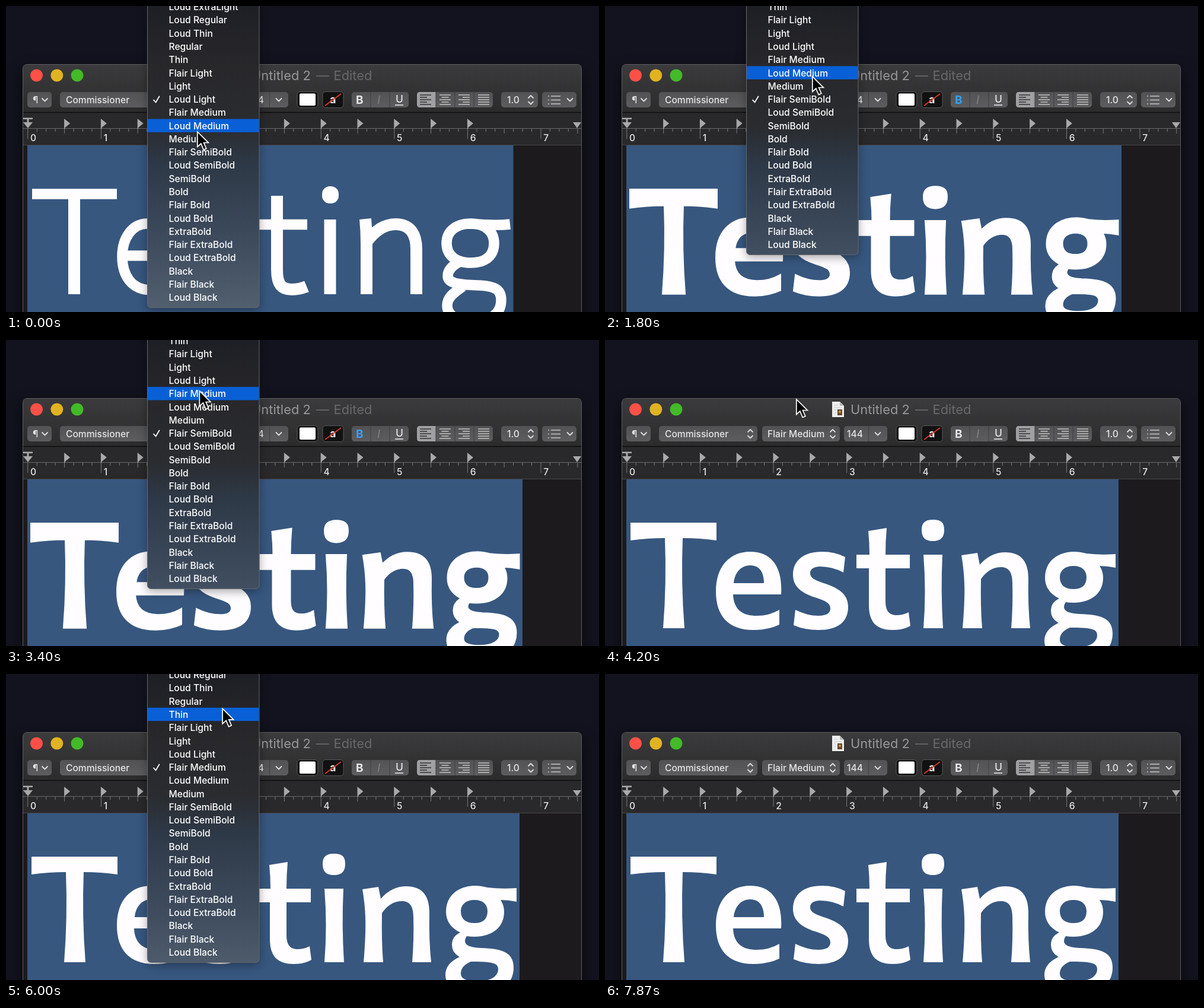
Recreate the animation shown at these times as an HTML page. Size 1000 by 516 pixels, loop 7940 ms.

```html
<!DOCTYPE html>
<html lang="en">
<head>
<meta charset="utf-8">
<title>Font menu</title>
<style>
html, body { margin: 0; width: 100%; height: 100%; overflow: hidden; background: #12131e; }
svg { display: block; width: 100%; height: 100%; }
text { font: 500 15.6px Inter, "Open Sans", sans-serif; fill: #e6e6e7; white-space: pre; }
.title { font-size: 21.9px; font-weight: 400; fill: #98989a; }
.dim { fill: #68686a; }
.line { fill: none; stroke: #dededf; stroke-width: 1.8; stroke-linecap: round; stroke-linejoin: round; }
.glyphs { fill: #fffdff; fill-rule: evenodd; }
.thin { fill: none; stroke: #fffdff; }
#menu text { fill: #fff; }
#menuBox { filter: drop-shadow(0 4px 8px rgba(0,0,0,.35)); }
</style>
</head>
<body>
<svg id="stage" viewBox="0 0 1000 516" preserveAspectRatio="none">
  <defs>
    <linearGradient id="chrome" x1="0" y1="0" x2="0" y2="1">
      <stop stop-color="#3b3b3d"/><stop offset="1" stop-color="#2b2b2c"/>
    </linearGradient>
    <linearGradient id="button" x1="0" y1="0" x2="0" y2="1">
      <stop stop-color="#525254"/><stop offset="1" stop-color="#5d5d5f"/>
    </linearGradient>
    <linearGradient id="glass" gradientUnits="userSpaceOnUse" x1="0" y1="0" x2="0" y2="516">
      <stop stop-color="#1e1f25"/><stop offset=".2" stop-color="#28282b"/>
      <stop offset=".4" stop-color="#2a2c30"/><stop offset=".52" stop-color="#2e3947"/>
      <stop offset=".78" stop-color="#3e4c5e"/><stop offset="1" stop-color="#52606f"/>
    </linearGradient>
    <filter id="shade" x="-10%" y="-10%" width="120%" height="120%"><feGaussianBlur stdDeviation="13"/></filter>
  </defs>

  <rect width="1000" height="516" fill="#12131e"/>
  <rect x="28" y="108" width="943" height="500" fill="#08080e" opacity=".6" filter="url(#shade)"/>
  <path d="M28.500 530V106Q28.500 98.500 36 98.500H963Q970.500 98.500 970.500 106V530Z" fill="#1c1a1c"/>
  <path d="M29 180V106Q29 99 36 99H963Q970 99 970 106V180Z" fill="url(#chrome)"/>
  <rect x="29" y="179" width="941" height="56" fill="#29282a"/>
  <path d="M29 179.500H970" stroke="#0e0e0f" stroke-width="1.500"/>
  <path d="M29 234.500H970" stroke="#454446"/>
  <path d="M28.500 530V106Q28.500 98.500 36 98.500H963Q970.500 98.500 970.500 106V530" fill="none" stroke="#5e5e61"/>

  <circle cx="51.500" cy="117" r="10.500" fill="#ff5047"/>
  <circle cx="85.800" cy="117" r="10.500" fill="#e1b322"/>
  <circle cx="120" cy="117" r="10.500" fill="#43ba27"/>
  <path d="M383 104H396L403 111V130H383Z" fill="#efefef"/>
  <path d="M396 104V111H403Z" fill="#b9b9b9"/>
  <path d="M386 110H393M386 114H399M386 118H390M386 122H390" stroke="#c9c9c9"/>
  <rect x="392" y="117" width="8" height="10" fill="#68482f"/>
  <circle cx="396" cy="121" r="2" fill="#d29b58"/>
  <text class="title" x="414" y="125">Untitled 2</text>
  <text class="title dim" x="523" y="125">—</text>
  <text class="title dim" x="552.500" y="125">Edited</text>

  <g id="toolbar"></g>
  <g id="ruler"></g>
  <rect id="selection" x="36" y="235" height="281" fill="#37577f"/>
  <g id="word"></g>

  <g id="menu">
    <rect id="menuBox" x="238.500" y="-20" width="188.500" rx="6" fill="url(#glass)" stroke="#66696d"/>
    <rect id="highlight" x="239" width="187.500" height="22.300" fill="#0960d6"/>
    <path class="line" d="M249 158.500L252.500 162.500L258.500 152.500" style="stroke:#fff"/>
    <g id="items"></g>
  </g>
  <path id="cursor" d="M0 0V25.500L6 20L10.500 30.500L15 28.500L10.700 18.500H18.500Z" fill="#000" stroke="#fff" stroke-width="1.700"/>
</svg>
<script>
const LOOP = 7940, ROW = 22.28, ANCHOR = 157.5, FADE = 230;
const $ = id => document.getElementById(id);
const set = (el, attrs) => { for (const k in attrs) el.setAttribute(k, attrs[k]); };

const styles = ('Loud ExtraLight,Loud Regular,Loud Thin,Regular,Thin,Flair Light,Light,Loud Light,' +
  'Flair Medium,Loud Medium,Medium,Flair SemiBold,Loud SemiBold,SemiBold,Bold,Flair Bold,Loud Bold,' +
  'ExtraBold,Flair ExtraBold,Loud ExtraBold,Black,Flair Black,Loud Black').split(',');
const indexOf = name => styles.indexOf(name);

// Toolbar
const label = (x, s) => `<text x="${x}" y="163.700">${s}</text>`;
const box = (x, right) => `<rect x="${x}" y="145" width="${right - x}" height="26" rx="5" fill="url(#button)"/>`;
const divider = x => `<path d="M${x} 145V171" stroke="#434345" stroke-width="1.200"/>`;
const chevron = x => `<path class="line" d="M${x - 4.5} 156L${x} 160.500L${x + 4.5} 156"/>`;
const stepper = x => `<path class="line" d="M${x - 4} 155L${x} 151L${x + 4} 155M${x - 4} 161.500L${x} 165.500L${x + 4} 161.500"/>`;
// Five text lines; every second one is shorter by cut and shifted by inset
const alignIcon = (x, cut, inset, color = '#c4c4c5') => [0, 1, 2, 3, 4].map(i => {
  const odd = i % 2;
  return `<path d="M${x + odd * inset} ${150 + i * 4}h${19 - odd * cut}" stroke="${color}" stroke-width="1.500"/>`;
}).join('');

$('toolbar').innerHTML =
  box(36, 77) + label(45, '¶') + chevron(65.5) +
  box(91, 257) + label(101, 'Commissioner') + stepper(245) +
  box(265, 396) + '<text id="styleName" x="274" y="163.700"></text>' + stepper(384) +
  box(403, 476) + label(408, '144') + divider(444.5) + chevron(460) +
  `<rect x="491" y="144.500" width="35" height="27" rx="5" fill="#111" stroke="#58585a"/>
   <rect x="495" y="147.500" width="27" height="20.500" rx="2" fill="#fff"/>
   <rect x="534" y="144.500" width="35" height="27" rx="5" fill="#111" stroke="#58585a"/>
   <text x="546" y="163.500" style="font-size:18px;font-weight:700;fill:#fff">a</text>
   <path d="M538 168L565 148" stroke="#d9342c" stroke-width="2"/>` +
  box(583, 679) + divider(615) + divider(647) +
  `<text id="bold" x="590" y="164.500" style="font-size:19px;font-weight:700">B</text>
   <text x="626" y="164.500" style="font-size:19px;font-weight:400;font-style:italic;fill:#828284">I</text>
   <text x="657" y="163" style="font-size:17.500px">U</text>
   <path d="M656 167H670" stroke="#e6e6e7" stroke-width="1.600"/>` +
  box(693, 821) +
  '<path d="M698 145H725V171H698Q693 171 693 166V150Q693 145 698 145Z" fill="#a09fa2"/>' +
  divider(725) + divider(757) + divider(789) +
  alignIcon(698, 7, 0, '#333') + alignIcon(731, 7, 3.5) + alignIcon(763, 7, 7) + alignIcon(796, 0, 0) +
  box(835, 897) + label(845, '1.0') + stepper(885) +
  box(904, 962) + [152, 158.5, 165].map(y =>
    `<path d="M914 ${y}h2M919 ${y}h16" stroke="#c4c4c5" stroke-width="1.600"/>`).join('') + chevron(951);

// Ruler
let ruler = '<path d="M29 206.500H970" stroke="#69686b"/>';
for (let i = 0; i <= 60; i++) {
  const x = 36.8 + i * 15.45;
  const length = i % 8 === 0 ? 17 : i % 4 === 0 ? 8 : 5;
  ruler += `<path d="M${x} 207v${length}" stroke="#7b7a7d"/>`;
  if (i % 8 === 0) ruler += `<text x="${x + 4.3}" y="228">${i / 8}</text>`;
  if (i % 4 === 0 && i > 0 && i <= 48) ruler += `<path d="M${x - .5} 190V207H${x + 1}V205L${x + 9.5} 198Z" fill="#a9a8ab"/>`;
}
$('ruler').innerHTML = ruler +
  '<path d="M29 188.500H45V191H38.500V196H45L37 206L29 196H35.500V191H29ZM956 196H970L963 206Z" fill="#a9a8ab"/>';

// Letterforms: flared outlines, plus a monoline skeleton for the light style
const flared = [
  'M43 308H188V338Q160 334 131 334Q128 410 134 486H98Q104 410 101 334Q72 334 43 338Z',
  'M297 429H216C217 455 232 465 256 465Q277 465 294 455V480Q275 489 250 489C208 489 187 465 187 424C187 382 210 357 245 357C280 357 300 382 297 429ZM217 410H268C268 391 260 380 245 380C230 380 219 391 217 410Z',
  'M405 366L402 392Q383 382 363 382C351 382 346 387 346 393C346 401 353 405 372 411C398 420 410 431 410 450C410 476 392 489 360 489Q337 489 318 481L321 455Q341 465 360 465C374 465 380 460 380 453C380 444 373 440 354 434C329 426 317 414 317 396C317 371 336 357 366 357Q388 357 405 366Z',
  'M444 322L475 317Q473 340 473 362H514V385H473V440C473 458 480 464 492 464Q503 464 512 459L515 482Q503 489 485 489C458 489 445 476 445 447V385H424V362H446Q446 342 444 322Z',
  'M537 362H569Q566 424 570 486H537Q542 424 537 362ZM553 303C568 303 572 309 572 320C572 332 567 339 553 339C539 339 534 332 534 320C534 309 539 303 553 303Z',
  'M601 363L628 359L632 379Q650 358 675 358C702 358 714 374 714 402Q713 450 717 486H685Q688 450 687 410C687 392 681 383 668 383Q648 383 634 403Q633 450 636 486H603Q607 440 606 410Q605 385 601 363Z',
  'M861 361V384Q847 381 834 381Q840 390 840 401C840 427 820 443 790 443Q782 443 777 442Q774 446 774 450C774 458 784 461 800 462C838 463 856 470 856 495C856 525 830 541 795 541C760 541 741 528 741 507Q741 488 765 477Q752 470 752 457Q752 442 766 436Q742 424 742 401C742 374 762 357 792 357Q800 357 812 360Q835 363 861 361Z' +
    'M790 381C775 381 767 389 767 400C767 413 775 420 790 420C805 420 812 413 812 400C812 389 805 381 790 381ZM784 485Q767 492 767 505C767 515 778 518 797 518C818 518 830 509 830 498C830 487 820 485 784 485Z'
];
const heavyShift = [0, 1, 1, 5.5, 4, 2, 3.5];
const stems = 'M115 318V486M457 320V445C457 470 465 478 482 478Q495 478 507 473M546.500 360V486' +
  'M606 359Q608 380 608 400V486M608 398Q630 368 657 368C682 368 692 385 692 410V486';
const curves = 'M44 317H187M415 368.500H508' +
  'M280 467Q262 479 245 479C212 479 196 455 196 422C196 390 214 367 238 367C267 367 279 390 277 421H200' +
  'M385 376Q370 368 352 368C310 368 312 408 348 419C398 432 390 478 348 478Q328 478 312 470' +
  'M784 367C756 367 743 382 743 400C743 420 758 433 784 433C810 433 823 420 823 400C823 382 810 367 784 367Q825 371 850 368' +
  'M765 431Q745 442 745 455C745 466 758 470 795 471C828 472 835 480 835 496C835 520 815 532 790 532C760 532 744 522 744 505C744 490 758 482 770 473';
const outline = (shift = [], attrs = '') => `<g class="glyphs" ${attrs}>` +
  flared.map((d, i) => `<path d="${d}" transform="translate(${shift[i] || 0})"/>`).join('') + '</g>';

const looks = {
  'Loud Light': { width: 819.5, art: `<path class="thin" d="${stems}" stroke-width="20"/>
    <path class="thin" d="${curves}" stroke-width="17.500"/>
    <rect x="533" y="304" width="28" height="29" rx="13" fill="#fffdff"/>` },
  'Flair SemiBold': { width: 835, art: outline(heavyShift,
    'stroke="#fffdff" stroke-width="4" transform="translate(0 7.600) scale(1 .982)"') },
  'Flair Medium': { width: 830, art: outline() }
};
$('word').innerHTML = Object.values(looks).map(look => `<g>${look.art}</g>`).join('');
const wordLayers = [...$('word').children];

$('items').innerHTML = styles.map((name, i) => `<text x="274.500" y="${i * ROW + 5.6}">${name}</text>`).join('');

// Menu sessions: opening time, closing time, checked style, picked style
const sessions = [
  [-1, 670, 'Loud Light', 'Flair SemiBold'],
  [1400, 3670, 'Flair SemiBold', 'Flair Medium'],
  [4900, 6260, 'Flair Medium', 'Thin']
];
// Pointer: time, x, y
const track = [
  [0, 322, 211], [450, 326, 247], [750, 328, 246], [1350, 345, 160], [1500, 346, 158], [1800, 349, 118],
  [2400, 341, 32], [3000, 333, 8], [3480, 325, 91], [3750, 324, 91], [4200, 322, 99], [4480, 330, 10],
  [4850, 345, 160], [4940, 346, 159], [5200, 351, 125], [5700, 352, 32], [6180, 370, 69], [6280, 371, 71],
  [6470, 376, 95], [6900, 384, -36], [LOOP, 384, -36]
];

function pointerAt(t) {
  const i = track.findIndex(p => p[0] > t);
  const [a, b] = [track[i - 1], track[i]];
  const u = (t - a[0]) / (b[0] - a[0]), k = u * u * (3 - 2 * u);
  return [a[1] + (b[1] - a[1]) * k, a[2] + (b[2] - a[2]) * k];
}

function render(t) {
  const [x, y] = pointerAt(t);
  set($('cursor'), { transform: `translate(${x + .8} ${y + 1})` });

  const current = t < 670 ? 'Loud Light' : t < 3670 ? 'Flair SemiBold' : 'Flair Medium';
  Object.keys(looks).forEach((name, i) => { wordLayers[i].style.display = name === current ? '' : 'none'; });
  set($('selection'), { width: looks[current].width });
  $('styleName').textContent = current;
  $('bold').style.fill = current === 'Flair SemiBold' ? '#35a0ee' : '#e6e6e7';

  const session = sessions.find(s => t >= s[0] && t < s[1] + FADE);
  $('menu').style.display = session ? '' : 'none';
  if (!session) return;
  const [, close, checked, picked] = session;
  const top = ANCHOR - indexOf(checked) * ROW;
  const row = t < close ? Math.round((y - top) / ROW) : indexOf(picked);
  $('menu').style.opacity = Math.min(1, 1 - (t - close) / FADE);
  set($('items'), { transform: `translate(0 ${top})` });
  set($('menuBox'), { height: top + (styles.length - 1) * ROW + 37 });
  set($('highlight'), { y: top + (row - .5) * ROW - .4 });
}

const start = performance.now();
function tick() {
  render((performance.now() - start) % LOOP);
  requestAnimationFrame(tick);
}
render(0);
requestAnimationFrame(tick);
</script>
</body>
</html>
```
